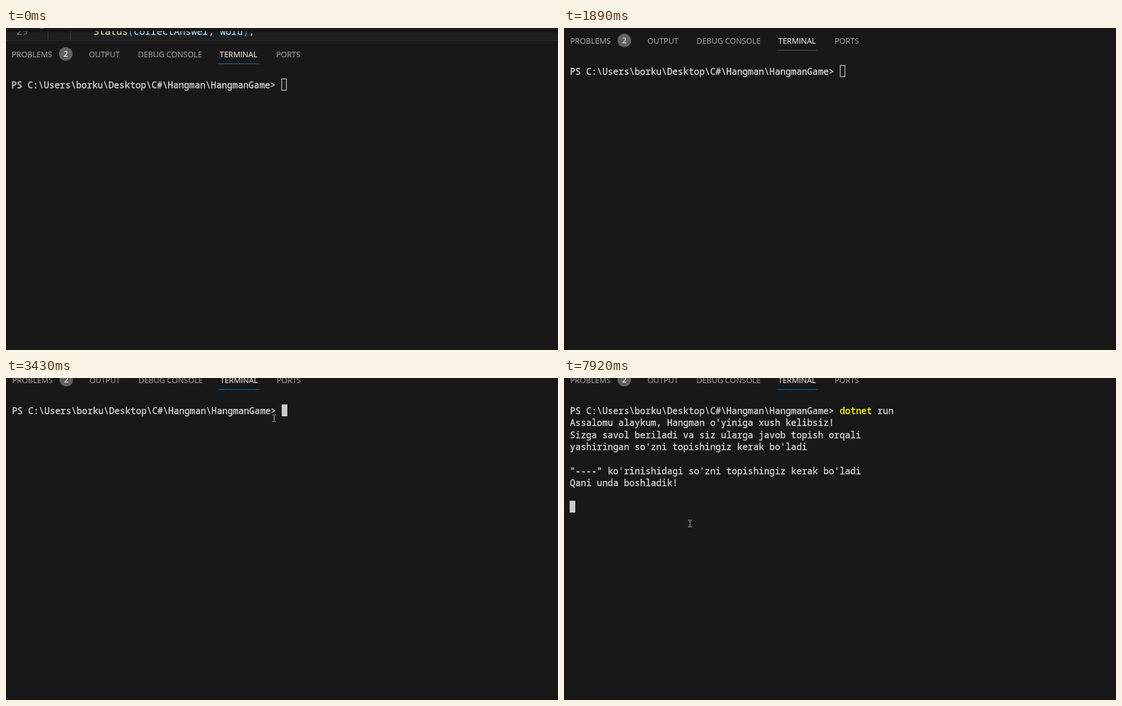
Recreate the animation shown at these times as an HTML page with a canvas. Size 979 by 572 pixels, loop 8 s.

```html
<!DOCTYPE html>
<html lang="uz">
<head>
<meta charset="utf-8">
<title>Terminal session</title>
<style>
html, body { margin: 0; width: 100%; height: 100%; overflow: hidden; background: #181818; }
canvas { display: block; }
</style>
</head>
<body>
<canvas id="stage" width="979" height="572"></canvas>
<script>
const ctx = document.getElementById('stage').getContext('2d');
const LOOP = 8000;
const MONO = '"Noto Sans Mono", "DejaVu Sans Mono", monospace';
const SANS = '"Open Sans", "Noto Sans", sans-serif';
const CELL = 9.57, ROW = 21.35;
const FG = '#d2d2d2', CARET = '#cccccc', YELLOW = '#ffff1a';
const PROMPT = 'PS C:\\Users\\borku\\Desktop\\C#\\Hangman\\HangmanGame> ';
const OUTPUT = [
  "Assalomu alaykum, Hangman o'yiniga xush kelibsiz!",
  'Sizga savol beriladi va siz ularga javob topish orqali',
  "yashiringan so'zni topishingiz kerak bo'ladi",
  '',
  "\"----\" ko'rinishidagi so'zni topishingiz kerak bo'ladi",
  'Qani unda boshladik!'
];
const TABS = [
  ['PROBLEMS', 10, 0, 132],
  ['OUTPUT', 147, 132, 218],
  ['DEBUG CONSOLE', 234, 218, 363],
  ['TERMINAL', 379, 363, 463],
  ['PORTS', 479, 463, 537]
];

const lerp = (a, b, p) => a + (b - a) * p;
const easeOut = (p, k) => 1 - Math.pow(1 - p, k);

// How many of n evenly spaced updates have happened by time t
function steps(t, start, end, n) {
  const i = Math.floor((t - start) * (n - 1) / (end - start) + 0.01) + 1;
  return Math.max(0, Math.min(n, i));
}

// weight: width of a thin outline that thickens the letters
function text(str, x, y, color, font, spacing = 0, weight = 0) {
  ctx.font = font;
  ctx.letterSpacing = spacing + 'px';
  ctx.fillStyle = color;
  ctx.fillText(str, x, y);
  if (!weight) return;
  ctx.strokeStyle = color;
  ctx.lineWidth = weight;
  ctx.lineJoin = 'round';
  ctx.strokeText(str, x, y);
}

function box(x, y, w, h, color) {
  ctx.fillStyle = color;
  ctx.fillRect(x, y, w, h);
}

function along(a, b, p) {
  return { x: lerp(a[0], b[0], p), y: lerp(a[1], b[1], p) };
}

// Pointer position, or null while it is off the stage
function pointer(t) {
  const glide = (a, b, start, end, n) =>
    along(a, b, easeOut(steps(t, start, end, n) / n, 1.6));
  if (t < 310) return null;
  if (t < 720) {
    const p = (steps(t, 310, 450, 3) - 1) / 2;
    return { ...along([907, 459], [473, 40], p), hand: p === 1 };
  }
  if (t < 1140) {
    const m = along([473, 40], [320, -14], steps(t, 720, 1140, 7) / 7);
    return { ...m, hand: m.y > 23 };
  }
  if (t < 2970) return null;
  if (t < 3430) return along([43, 45], [483, 66], (steps(t, 2970, 3230, 5) - 1) / 4);
  if (t < 3630) return { x: 475, y: 71 };
  if (t < 4620) return { x: 490, y: 60 };
  if (t < 7640) return glide([484, 66], [364, 148], 5300, 5640, 6);
  return glide([364, 148], [223.5, 258], 7640, 7920, 5);
}

function drawBeam(x, y) {
  x = Math.round(x - 0.5);
  y = Math.round(y);
  box(x, y - 5, 1, 11, '#d0d0d0');
  for (const dy of [-6, 6]) {
    box(x - 3, y + dy, 3, 1, '#b8b8b8');
    box(x + 1, y + dy, 3, 1, '#b8b8b8');
  }
}

function drawHand(x, y) {
  ctx.save();
  ctx.translate(x, y);
  ctx.beginPath();
  ctx.moveTo(-1, 1);
  ctx.lineTo(1, 1);
  ctx.lineTo(1.3, 6);
  ctx.lineTo(6.5, 8);
  ctx.lineTo(6, 13);
  ctx.lineTo(4.5, 16);
  ctx.lineTo(-1, 16);
  ctx.lineTo(-4.5, 10);
  ctx.lineTo(-3.5, 8.7);
  ctx.lineTo(-1, 11);
  ctx.closePath();
  ctx.fillStyle = '#fff';
  ctx.strokeStyle = '#000';
  ctx.lineWidth = 1;
  ctx.fill();
  ctx.stroke();
  ctx.restore();
}

function drawEditor() {
  const font = '17px ' + MONO;
  box(-2, 0, 983, 22, '#1f1f1f');
  text('29', 18.5, 12, '#6e7681', font);
  let x = 155;
  const code = [
    ['Status', '#dcdcaa'], ['(', '#179fff'], ['correctAnswer', '#9cdcfe'],
    [', ', '#cccccc'], ['word', '#9cdcfe'], [')', '#179fff'], [';', '#cccccc']
  ];
  for (const [part, color] of code) {
    text(part, x, 12, color, font, 0, 0.3);
    x += part.length * 10.2;
  }
  box(74, 5, 1, 17, '#484848');
  box(114, 5, 1, 17, '#484848');
  // Pinned line with its shadow hides the tops of the letters
  box(-2, 0, 983, 5, '#1c1c1c');
  const shade = ctx.createLinearGradient(0, 4, 0, 9);
  shade.addColorStop(0, 'rgba(0,0,0,.5)');
  shade.addColorStop(1, 'rgba(0,0,0,0)');
  box(-2, 4, 983, 5, shade);
  box(60, 0, 7, 1, '#777777');
  box(-2, 22, 983, 1, '#2b2b2b');
}

function drawTabs(t, mouse) {
  for (const [name, x, left, right] of TABS) {
    const hover = mouse && mouse.hand && mouse.x >= left && mouse.x < right;
    const lit = hover || name === 'TERMINAL';
    text(name, x, 51.5, lit ? '#e4e4e4' : '#9d9d9d', '14px ' + SANS, -0.08, 0.15);
  }
  ctx.beginPath();
  ctx.arc(106, 46, 12, 0, Math.PI * 2);
  ctx.fillStyle = '#616161';
  ctx.fill();
  ctx.textAlign = 'center';
  text('2', 106, 51, '#f8f8f8', '14px ' + SANS, 0, 0.15);
  ctx.textAlign = 'left';
  const idle = t >= 1750 && t < 2300;
  box(376, 63, 73, 1, idle ? '#5c5c5c' : '#0f78c8');
}

function drawTerminal(t) {
  const font = '15.95px ' + MONO;
  const x0 = 9.5, base = 106.8;
  const line = (str, col, row, color = FG) =>
    text(str, x0 + col * CELL, base + row * ROW, color, font, 0, 0.4);
  const caret = (col, row) =>
    box(Math.floor(x0 + col * CELL), Math.round(89.8 + row * ROW), 10, 21, CARET);

  line(PROMPT, 0, 0);
  const col = PROMPT.length;
  if (t < 3430) {
    ctx.strokeStyle = CARET;
    ctx.lineWidth = 1.3;
    ctx.lineJoin = 'miter';
    ctx.strokeRect(x0 + col * CELL + 0.9, 90.5, 8.4, 20);
  } else if (t < 3830) {
    caret(col, 0);
  } else if (t < 4150) {
    line('dotne', col, 0, '#cccc28');
    caret(col + 5, 0);
  } else {
    line('dotnet', col, 0, YELLOW);
    line('run', col + 7, 0);
    if (t < 4620) caret(col + 10, 0);
    else if (t < 6100) caret(0, 1);
    else {
      OUTPUT.forEach((str, i) => line(str, 0, i + 1));
      caret(0, 8);
    }
  }
}

function draw(t) {
  const mouse = pointer(t);
  const shift = 43.4 * easeOut(steps(t, 1750, 2440, 11) / 11, 2.56);
  box(0, 0, 979, 572, '#181818');
  ctx.save();
  ctx.translate(t >= 1750 ? 1 : 0, -Math.round(shift));
  drawEditor();
  drawTabs(t, mouse);
  drawTerminal(t);
  ctx.restore();
  if (mouse) (mouse.hand ? drawHand : drawBeam)(mouse.x, mouse.y);
}

function tick() {
  draw(performance.now() % LOOP);
  requestAnimationFrame(tick);
}
tick();
</script>
</body>
</html>
```
